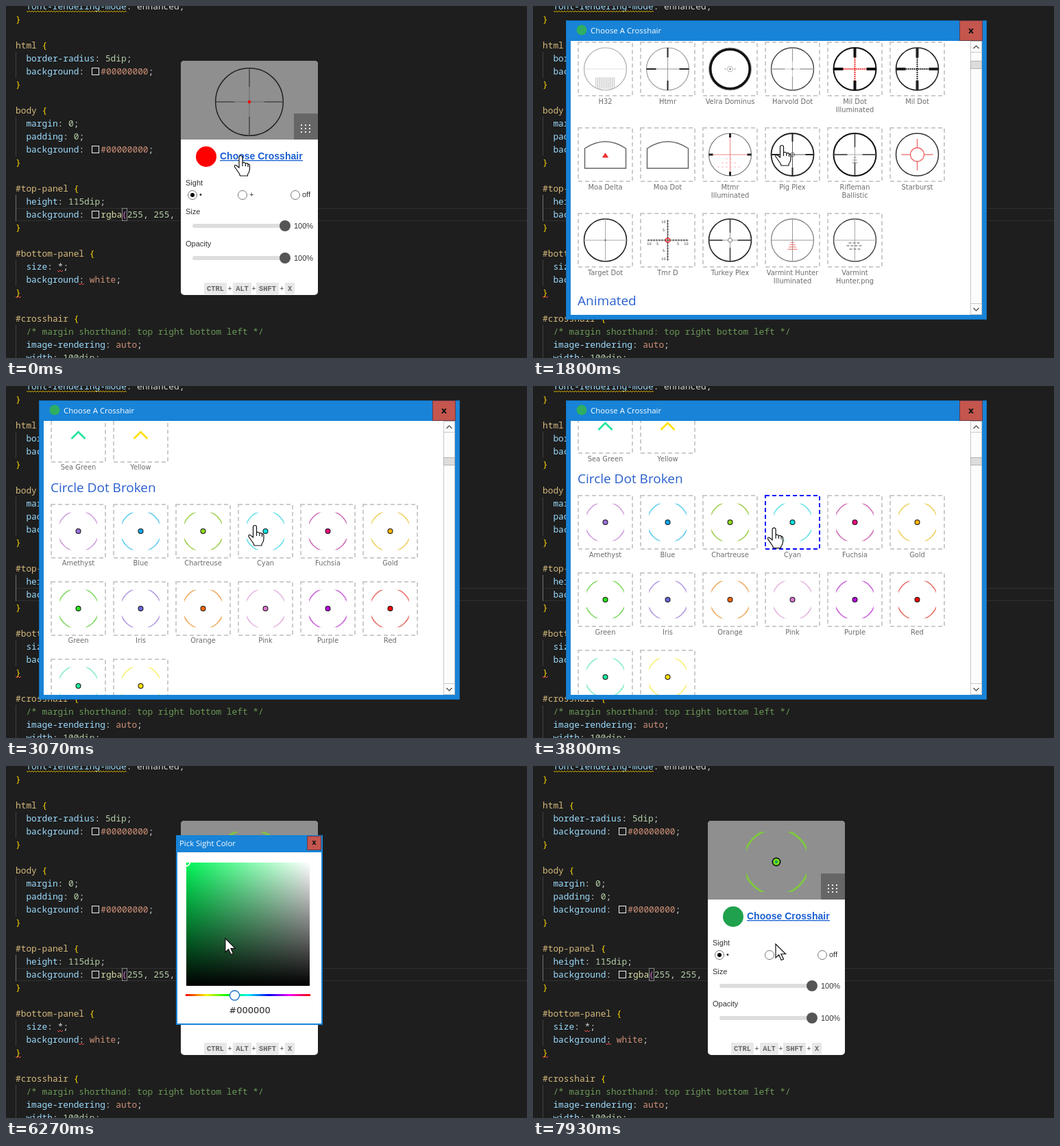
These frames come from a looping animation (760 px wide and 514 px high, 8 s). An HTML page with a canvas:

```html
<!DOCTYPE html>
<html lang="en">
<head>
<meta charset="utf-8">
<title>Crosshair chooser</title>
<style>
html, body { margin: 0; width: 100%; height: 100%; overflow: hidden; background: #1e1e1e; }
canvas { display: block; }
</style>
</head>
<body>
<canvas id="stage" width="760" height="514"></canvas>
<script>
const W = 760, H = 514, LOOP = 8000, STEP = 200 / 3;
const stage = document.getElementById('stage').getContext('2d');
const layer = document.createElement('canvas');
layer.width = W; layer.height = H;
const layerCtx = layer.getContext('2d');
let g = stage;

const UI = '"Open Sans", sans-serif', ARIAL = '"Liberation Sans", sans-serif';
const VERDANA = '"DejaVu Sans", sans-serif', MONO = '"Noto Sans Mono", monospace';
const BLUE = '#1883d7', PICKED = '#20a14d';

// ---- helpers
const clamp = (v, a = 0, b = 1) => Math.min(b, Math.max(a, v));
function track(keys, t) {
  let i = 1;
  while (i < keys.length - 1 && keys[i][0] < t) i++;
  const [a, b] = [keys[i - 1], keys[i]], p = clamp((t - a[0]) / (b[0] - a[0]));
  return a.slice(1).map((v, k) => v + (b[k + 1] - v) * p);
}
function rect(x, y, w, h, color) { g.fillStyle = color; g.fillRect(x, y, w, h); }
function frame(x, y, w, h, color) { g.strokeStyle = color; g.lineWidth = 1; g.strokeRect(x + .5, y + .5, w - 1, h - 1); }
function text(s, x, y, font, color, align = 'left') {
  g.font = font; g.fillStyle = color; g.textAlign = align; g.fillText(s, x, y);
}
function line(color, width, ...p) {
  g.strokeStyle = color; g.lineWidth = width; g.beginPath();
  for (let i = 0; i < p.length; i += 2) g.lineTo(p[i], p[i + 1]);
  g.stroke();
}
function circle(x, y, r) { g.beginPath(); g.arc(x, y, r, 0, 7); }
function disc(x, y, r, color) { circle(x, y, r); g.fillStyle = color; g.fill(); }
function ring(r, color, width, x = 0, y = 0) { circle(x, y, r); g.strokeStyle = color; g.lineWidth = width; g.stroke(); }
function shape(d, fill, stroke, width) {
  const p = new Path2D(d);
  if (fill) { g.fillStyle = fill; g.fill(p); }
  g.strokeStyle = stroke; g.lineWidth = width; g.stroke(p);
}
function at(x, y, draw) { g.save(); g.translate(x, y); draw(); g.restore(); }
function clipped(x, y, w, h, draw) {
  g.save(); g.beginPath(); g.rect(x, y, w, h); g.clip(); draw(); g.restore();
}

// ---- editor: tokens start with a colour key, @ is a colour swatch
const INK = { p: '#9cdcfe', s: '#d7ba7d', w: '#d4d4d4', b: '#ffd700', n: '#b5cea8',
              v: '#ce9178', c: '#6a9955', f: '#dcdcaa', k: '#da70d6' };
const CLEAR = 'p  background|w: |@|v#00000000|w;';
const CODE = [
  'p  font-rendering-mode|w: enhanced;', 'b}', '',
  'shtml |b{', 'p  border-radius|w: |n5dip|w;', CLEAR, 'b}', '',
  'sbody |b{', 'p  margin|w: |n0|w;', 'p  padding|w: |n0|w;', CLEAR, 'b}', '',
  's#top-panel |b{', 'p  height|w: |n115dip|w;', 'p  background|w: |@|frgba|k(|n255|w, |n255|w, ', 'b}', '',
  's#bottom-panel |b{', 'p  size|w: *;', 'p  background|w: |vwhite|w;', 'b}', '',
  's#crosshair |b{', 'c  /* margin shorthand: top right bottom left */',
  'p  image-rendering|w: |vauto|w;', 'p  width|w: |n100dip|w;'
];
function squiggle(x, y, w, color) {
  const p = [];
  for (let i = 0; i <= w; i += 2) p.push(x + i, y + (i % 4 ? 1 : -1));
  line(color, 1, ...p);
}
function editor() {
  rect(0, 0, W, H, '#1e1e1e');
  rect(14, 295, W, 1, '#303030'); rect(14, 313, W, 1, '#303030');
  [[67, 38], [162, 57], [276, 38], [371, 38], [466, 48]].forEach(([y, h], i) =>
    rect(14, y, 1, h, i === 2 ? '#707070' : '#404040'));
  frame(169, 295, 8, 19, '#888');
  CODE.forEach((row, n) => {
    let x = 14;
    const y = 5 + 19 * n;
    for (const tok of row.split('|')) {
      if (tok === '@') { frame(125, y - 10, 11, 11, '#eee'); x += 16.5; continue; }
      text(tok.slice(1), x, y, '12.83px ' + MONO, INK[tok[0]]);
      x += 7.7 * Math.max(0, tok.length - 1);
    }
  });
  squiggle(30, 8, 146, '#cca700');
  squiggle(75, 387, 8, '#f14c4c'); squiggle(106, 406, 8, '#f14c4c'); squiggle(14, 425, 8, '#f14c4c');
}

// ---- reticles, drawn around 0,0 with radius 31
const RED = '#e33';
function reticle(ringColor, ringWidth, mid, end, endWidth, endLen) {
  ring(31, ringColor, ringWidth);
  for (let i = 0; i < 4; i++) {
    g.save(); g.rotate(i * Math.PI / 2);
    if (mid) line(mid, 1, 0, 0, 31, 0);
    if (end) line(end, endWidth, 31 - endLen, 0, 31, 0);
    g.restore();
  }
}
function ladder(color, n, grow, gap = 4) {
  for (let i = 1; i <= n; i++) line(color, 1, -1 - i * grow, i * gap, 1 + i * grow, i * gap);
}
function fan(color) {
  g.setLineDash([2, 2]);
  line(color, 1, -3, 4, -14, 26); line(color, 1, 0, 4, 0, 24); line(color, 1, 3, 4, 14, 26);
  g.setLineDash([]);
}
function dotted(color, r) {
  g.setLineDash([2, 1]);
  line(color, 2, -r, 0, r, 0); line(color, 2, 0, -r, 0, r);
  g.setLineDash([]);
}
function grid(color, x, y, w, h, gap) {
  for (let j = 0; j <= h; j += gap) line(color, .7, x, y + j, x + w, y + j);
  for (let i = 0; i <= w; i += gap) line(color, .7, x + i, y, x + i, y + h);
}
const dome = () => shape('M-30 20V-9Q0-29 30-9V20Z', null, '#666', 1.5);
function axes() {
  line('#555', 1, -30, 0, 30, 0); line('#555', 1, 0, -30, 0, 30);
  for (let i = -28; i <= 28; i += 4) { line('#555', 1, i, -1.5, i, 1.5); line('#555', 1, -1.5, i, 1.5, i); }
  for (const [s, d] of [['10', 27], ['5', 15]])
    for (const k of [-d, d]) { text(s, k, 7, '5px ' + VERDANA, '#333', 'center'); text(s, -6, k + 2, '5px ' + VERDANA, '#333', 'center'); }
  ring(3, RED, 1.5);
}
const ACTUAL = [
  ['Ballistic Firedot', ['#333', 1.6, '#888', '#333', 2, 22], () => { disc(0, 0, 3, '#fff'); ring(3, '#444', 1.2); ladder('#777', 5, .4); }],
  ['Ballistic', ['#777', 1.2, '#aaa', '#444', 2, 20]],
  ['Blackout', ['#333', 1.4], () => { ladder('#888', 6, .3); line(RED, 1, -3, 0, 3, 0); line('#888', 1, 0, 0, 0, 26); }],
  ['Tarne Wickholt\nIlluminated', ['#111', 2, null, '#111', 2, 20], () => { ladder(RED, 2, 2); line(RED, 1, -6, 0, 6, 0); line(RED, 1, 0, -5, 0, 11); }],
  ['Tarne Wickholt', ['#999', 1.2, '#bbb', '#999', 1.3, 20], () => ladder('#999', 2, 2)],
  ['Bull Ring Post', ['#aaa', 1.2], () => { line('#aaa', 1, -31, 0, 31, 0); line('#777', 1.5, 0, 0, 0, 31); }],
  ['Bullseye', ['#222', 1.6], () => ring(15.5, '#e66', 1.2)],
  ['Cm R2', ['#999', 1.2], () => { line('#aaa', 1, -14, 0, 14, 0); line(RED, 1, -4, 0, 4, 0); ladder('#c88', 4, .5); line('#999', 1, 0, 0, 0, 20); }],
  ['Cmrw 556', ['#222', 1.5, null, '#333', 2, 9], () => { fan('#555'); line('#aaa', 1, -22, 0, 22, 0); disc(0, 0, 2, RED); }],
  ['Cmrw 762', ['#444', 1.4, null, '#555', 2, 9], () => { fan('#555'); line('#aaa', 1, -22, 0, 22, 0); disc(0, 0, 2, '#777'); }],
  ['Cmrw Devo', null, () => { shape('M-30-21H30V-5Q28 22 0 22Q-28 22-30-5Z', null, '#333', 1.5); line('#888', 1, -14, -10, 14, -10); at(0, -10, () => ladder('#777', 4, .6)); }],
  ['Cmrw Grid', ['#999', 1.2, null, '#777', 1.5, 12], () => { line('#aaa', 1, -20, 0, 20, 0); line('#999', 1, 0, -20, 0, 8); grid('#666', -9, 8, 18, 15, 3); }],
  ['Crossbones', ['#333', 1.6, null, '#333', 2, 25], () => ladder('#666', 5, .5)],
  ['Crosshair', ['#444', 1.5, '#888']],
  ['Duplex\nIlluminated', ['#333', 1.6, '#999', '#333', 2, 17], () => disc(0, 0, 2, '#e88')],
  ['Duplex', ['#333', 1.6, '#999', '#333', 2, 17]],
  ['Ffp Cch', ['#777', 1.4, '#999', '#444', 2, 8], () => { ladder('#888', 6, 1.3); grid('#999', -7, 8, 14, 16, 3); }],
  ['Firedot 4', ['#222', 1.5, '#666'], () => { line('#111', 3, -31, 0, -10, 0); line('#111', 3, 10, 0, 31, 0); line('#111', 3, 0, 10, 0, 31); }],
  ['H32', ['#aaa', 1.2, null], () => { line('#ddd', 1, -31, 0, 31, 0); grid('#bbb', -14, 13, 28, 15, 3); }],
  ['Htmr', ['#999', 1.2, '#999', '#222', 2, 14]],
  ['Velra Dominus', null, () => { ring(29, '#111', 4); ring(31, '#aaa', 1); ring(4, '#999', .7); disc(0, 0, 1, '#333'); disc(-7, 0, 1, '#aaa'); disc(7, 0, 1, '#aaa'); }],
  ['Harvold Dot', ['#444', 1.4, '#ccc', '#999', 1.2, 20], () => disc(0, 0, 1.5, '#999')],
  ['Mil Dot\nIlluminated', ['#111', 2, null, '#111', 4, 14], () => dotted(RED, 17)],
  ['Mil Dot', ['#222', 1.6, null, '#222', 4, 14], () => dotted('#222', 17)],
  ['Moa Delta', null, () => { dome(); shape('M0-2L4 4H-4Z', RED, RED, 1); }],
  ['Moa Dot', null, dome],
  ['Mtmr\nIlluminated', ['#777', 1.2, '#e88', '#222', 3, 6], () => { g.setLineDash([2, 4]); for (const y of [6, 12, 18]) line('#e99', 1, -y, y, y, y); g.setLineDash([]); }],
  ['Pig Plex', ['#222', 1.8, '#555', '#222', 2, 12], () => ring(3, '#666', 1)],
  ['Rifleman\nBallistic', ['#111', 2, '#aaa', '#333', 1.5, 20], () => ladder('#888', 3, 1)],
  ['Starburst', ['#333', 1.5], () => { ring(10, '#e66', 1.3); for (const s of [-1, 1]) { line('#e66', 1.3, 10 * s, 0, 23 * s, 0); line('#e66', 1.3, 0, 10 * s, 0, 23 * s); } }],
  ['Target Dot', ['#222', 1.6, '#aaa'], () => disc(0, 0, 1.3, '#777')],
  ['Tmr D', null, axes],
  ['Turkey Plex', ['#222', 1.6, '#999', '#333', 1.5, 20], () => { disc(0, 0, 3, '#fff'); ring(3, '#777', 1); }],
  ['Varmint Hunter\nIlluminated', ['#888', 1.3, '#999'], () => ladder('#e66', 4, 1.5, 3.3)],
  ['Varmint\nHunter.png', ['#444', 1.5, '#aaa'], () => { for (const [y, w] of [[4, 9], [8, 12], [13, 8]]) { g.setLineDash([4, 2]); line('#555', 1.2, -w, y, w, y); g.setLineDash([]); } }]
].map(([label, spec, extra]) => [label, () => { if (spec) reticle(...spec); if (extra) extra(); }]);

function brokenCircle(size, color, dot, width) {
  clipped(-.44 * size, -.44 * size, .88 * size, .88 * size, () => ring(.48 * size, color, width));
  if (size < 80) { disc(0, 0, 4, '#111'); disc(0, 0, 3, dot); }
}
const HUES = { Amethyst: ['#9a6fdc', '#cf9fdc'], Blue: ['#11a8f0', '#5fccf0'], Chartreuse: ['#8fd91e', '#9fcf4e'],
  Cyan: ['#0de0e0', '#66e0ea'], Fuchsia: ['#f00a80', '#d070b8'], Gold: ['#ffb400', '#ecd060'],
  Green: ['#2be01e', '#7fd860'], Iris: ['#6a66d8', '#b49ae0'], Orange: ['#ff6a10', '#eeaa60'],
  Pink: ['#d878d0', '#e4b4e0'], Purple: ['#b808e0', '#cc60dc'], Red: ['#f50808', '#e87068'],
  'Sea Green': ['#1de49a', '#84ecc4'], Yellow: ['#ffe000', '#f6f070'] };
const palette = draw => Object.entries(HUES).map(([name, [dot, arc]]) => [name, () => draw(dot, arc)]);
const SECTIONS = [
  ['Actual', ACTUAL],
  ['Animated', ['Blue', 'Green', 'Red'].map(n => [n, () => { ring(15, HUES[n][1], 2); disc(0, 0, 3, HUES[n][0]); }])],
  ['Chevron', palette(dot => line(dot, 2.5, -10, 5, 0, -5, 10, 5))],
  ['Circle Dot Broken', palette((dot, arc) => brokenCircle(62, arc, dot, 1.6))]
];

// Lay items out six to a row; two-line labels make the row taller.
const headings = [], items = [];
let flow = 64;
for (const [title, list] of SECTIONS) {
  headings.push([title, flow]);
  flow += 24;
  for (let i = 0; i < list.length; i += 6) {
    const row = list.slice(i, i + 6);
    row.forEach(([label, draw], k) => items.push({ label: label.split('\n'), draw, x: 105.5 + 91 * k, y: flow }));
    flow += row.some(([label]) => label.includes('\n')) ? 125 : 113;
  }
  flow += 3;
}

// ---- windows
function closeButton(x, y, w, h, size) {
  rect(x, y, w, h, '#c4564e');
  frame(x, y, w, h, '#6b3a48');
  text('x', x + w / 2, y + h / 2 + size * .27, `bold ${size}px ${VERDANA}`, '#111', 'center');
}
function scrollbar(scroll) {
  rect(638, 51, 17, 400, '#fcfcfc');
  frame(638, 51, 17, 400, '#c8c8c8'); frame(638, 51, 17, 17, '#c8c8c8'); frame(638, 434, 17, 17, '#c8c8c8');
  line('#444', 1.2, 642.5, 62, 646.5, 58, 650.5, 62);
  line('#444', 1.2, 642.5, 441, 646.5, 445, 650.5, 441);
  const y = Math.round(68 + scroll * .0303);
  rect(638, y, 17, 12, '#dcdcdc'); frame(638, y, 17, 12, '#b4b4b4');
}
function chooser(scroll, mouse) {
  rect(48, 21, 614, 437, BLUE);
  frame(48, 21, 614, 437, '#1671b8');
  disc(71, 35, 7.5, '#2fae62');
  text('Choose A Crosshair', 84, 40, '11.4px ' + UI, '#fff');
  closeButton(622, 21, 34, 30, 13);
  rect(55, 51, 600, 400, '#fff');
  clipped(55, 51, 583, 400, () => {
    g.translate(0, -scroll);
    for (const [title, y] of headings) text(title, 65, y + 7, '19px ' + UI, '#2a5fcf');
    for (const { label, draw, x, y } of items) {
      if (y < scroll - 80 || y > scroll + 460) continue;
      const hover = mouse && Math.abs(mouse[0] - x) < 40 && Math.abs(mouse[1] + scroll - y - 40) < 40;
      g.setLineDash([6, 4]);
      g.strokeStyle = hover ? '#00f' : '#ccc'; g.lineWidth = 2;
      g.strokeRect(x - 39.5, y + 1, 79, 78);
      g.setLineDash([]);
      at(x, y + 40, draw);
      label.forEach((s, i) => text(s, x, y + 90.5 + 12 * i, '9.9px ' + VERDANA, '#6c6c6c', 'center'));
    }
  });
  scrollbar(scroll);
}

function panel(chosen, sight) {
  g.save();
  g.beginPath(); g.roundRect(255, 80, 200, 342, 5); g.clip();
  rect(255, 80, 200, 342, '#fff');
  rect(255, 80, 200, 115, '#8f8f8f');
  rect(420, 157, 35, 38, '#666');
  for (let i = 0; i < 9; i++) rect(430 + i % 3 * 6, 173 + Math.floor(i / 3) * 5, 2, 2, '#eee');
  at(355, 140, () => {
    if (chosen) {
      brokenCircle(100, '#7fc840', '', 3);
      disc(0, 0, 6.5, '#111'); disc(0, 0, 4.8, '#74e41c');
    } else {
      ring(49.3, '#222', 1.5);
      for (let i = 0; i < 4; i++) {
        line('#6a6a6a', 1, 0, 0, 49, 0); line('#4c4c4c', 1.6, 22, 0, 49, 0);
        g.rotate(Math.PI / 2);
      }
    }
    disc(0, 0, 2.3, sight);
  });
  g.restore();

  disc(292, 220, 15, sight);
  text('Choose Crosshair', 312, 224, 'bold 14px ' + ARIAL, '#1b5fd0');
  rect(312, 225, 121, 1.3, '#1b5fd0');
  const small = (s, x, y) => text(s, x, y, '11px ' + ARIAL, '#333');
  small('Sight', 262, 262); small('Size', 262, 304); small('Opacity', 262, 351);
  small('•', 282, 279); small('+', 355, 279); small('off', 432, 279);
  for (const x of [272, 345, 422]) ring(6.5, '#777', 1, x, 276);
  disc(272, 276, 3, '#000');
  for (const y of [321, 368]) {
    g.beginPath(); g.roundRect(272, y - 3, 135, 6, 3); g.fillStyle = '#ddd'; g.fill();
    disc(407, y, 8, '#555');
    small('100%', 420, y + 3.5);
  }
  for (const [key, x, w] of [['CTRL', 289, 33], ['ALT', 331, 27], ['SHFT', 365, 33], ['X', 407, 14]]) {
    rect(x, 404, w, 17, '#e8e8e8');
    text(key, x + w / 2, 415.5, 'bold 10.4px "Liberation Mono", monospace', '#666', 'center');
  }
  for (const x of [326.5, 361.5, 402.5]) text('+', x, 416, '10px ' + ARIAL, '#444', 'center');
}

function gradient(x0, y0, x1, y1, stops) {
  const grad = g.createLinearGradient(x0, y0, x1, y1);
  stops.forEach((c, i) => grad.addColorStop(i / (stops.length - 1), c));
  return grad;
}
function picker(hueX, picked) {
  rect(248, 101, 214, 277, BLUE);
  text('Pick Sight Color', 253, 117, '11.4px ' + UI, '#fff');
  closeButton(439, 102, 21, 21, 10);
  rect(250, 126, 210, 250, '#fff');
  const hue = (hueX - 262) / 182 * 360;
  rect(263, 141, 180, 180, gradient(263, 0, 443, 0, [`hsl(${hue},100%,48%)`, '#fff']));
  rect(263, 141, 180, 180, gradient(0, 141, 0, 321, ['rgba(0,0,0,0)', '#000']));
  clipped(263, 141, 180, 180, () => ring(5, '#fff', 2, ...(picked ? [299, 209] : [263, 141])));
  rect(262, 333, 182, 3, gradient(262, 0, 444, 0, [0, 60, 120, 180, 240, 300, 360].map(h => `hsl(${h},100%,48%)`)));
  disc(hueX, 335, 7, '#fff'); ring(7, '#1d6fd0', 1.3, hueX, 335);
  text(picked ? PICKED : '#000000', 355.5, 361, '13px ' + VERDANA, '#222', 'center');
}

const HAND = 'M-2.5 2Q-2.5-.5 0-.5Q2.5-.5 2.5 2V10Q5 8.5 7 11Q9.500 9.800 10.500 12Q13 11.500 13 14.500V19Q13 23 10 27V29H-1L-2 26Q-6 20-9 16Q-9.500 12.500-7 13.500L-2.500 17ZM2.500 10V15M6.800 11V15M10.500 12V16';
const ARROW = 'M0 0V20L4.700 15.800L8.200 23.500L11.500 22L8 14.500H14.500Z';

// ---- motion
const MOUSE = [[1270, 342.5, 219], [1530, 363, 204], [3733, 363, 204], [4130, 295.5, 226], [5133, 295.5, 226],
  [5500, 264, 334], [5930, 333.5, 335], [6066, 333.5, 335], [6266, 320, 252], [6400, 299, 209], [6600, 299, 209],
  [6933, 430, 140], [7200, 449, 112], [7400, 449, 112], [7930, 354, 260]];
const SCROLL = [[1400, 0], [1800, 399], [2670, 1085], [2800, 1100]];

function scrollAt(t) {
  return t < 2990 ? track(SCROLL, t)[0] : 1200 - 100 * Math.exp((2933 - t) / 65.5);
}
function chooserAlpha(t) {
  if (t < 990) return 0;
  return t < 3000 ? 1 - (1 - clamp((t - 933) / 446)) ** 3 : 1 - clamp((t - 4200) / 200);
}

function render(now) {
  const t = Math.floor((now % LOOP + 4) / STEP) * STEP;
  const mouse = track(MOUSE, t);
  const picking = t >= 4860 && t < 7330;
  editor();
  panel(t >= 4130, t >= 7000 ? PICKED : '#f00');

  const alpha = chooserAlpha(t);
  if (alpha > 0) {
    g = layerCtx;
    g.clearRect(0, 0, W, H);
    chooser(scrollAt(t), t < 1450 || t > 3790 ? mouse : null);
    g = stage;
    g.save();
    g.globalAlpha = alpha;
    const s = .95 + .05 * alpha;
    g.translate(355, 239.5); g.scale(s, s);
    g.drawImage(layer, -355, -239.5);
    g.restore();
  }
  if (picking) {
    const hueX = t < 5490 ? 262 : t < 5940 ? clamp(mouse[0], 262, 333.5) : 333.5;
    picker(hueX, t >= 6400);
  }
  at(...mouse, () => shape(t < 4860 ? HAND : ARROW, '#fff', '#111', 1.2));
  requestAnimationFrame(render);
}
requestAnimationFrame(render);
</script>
</body>
</html>
```
